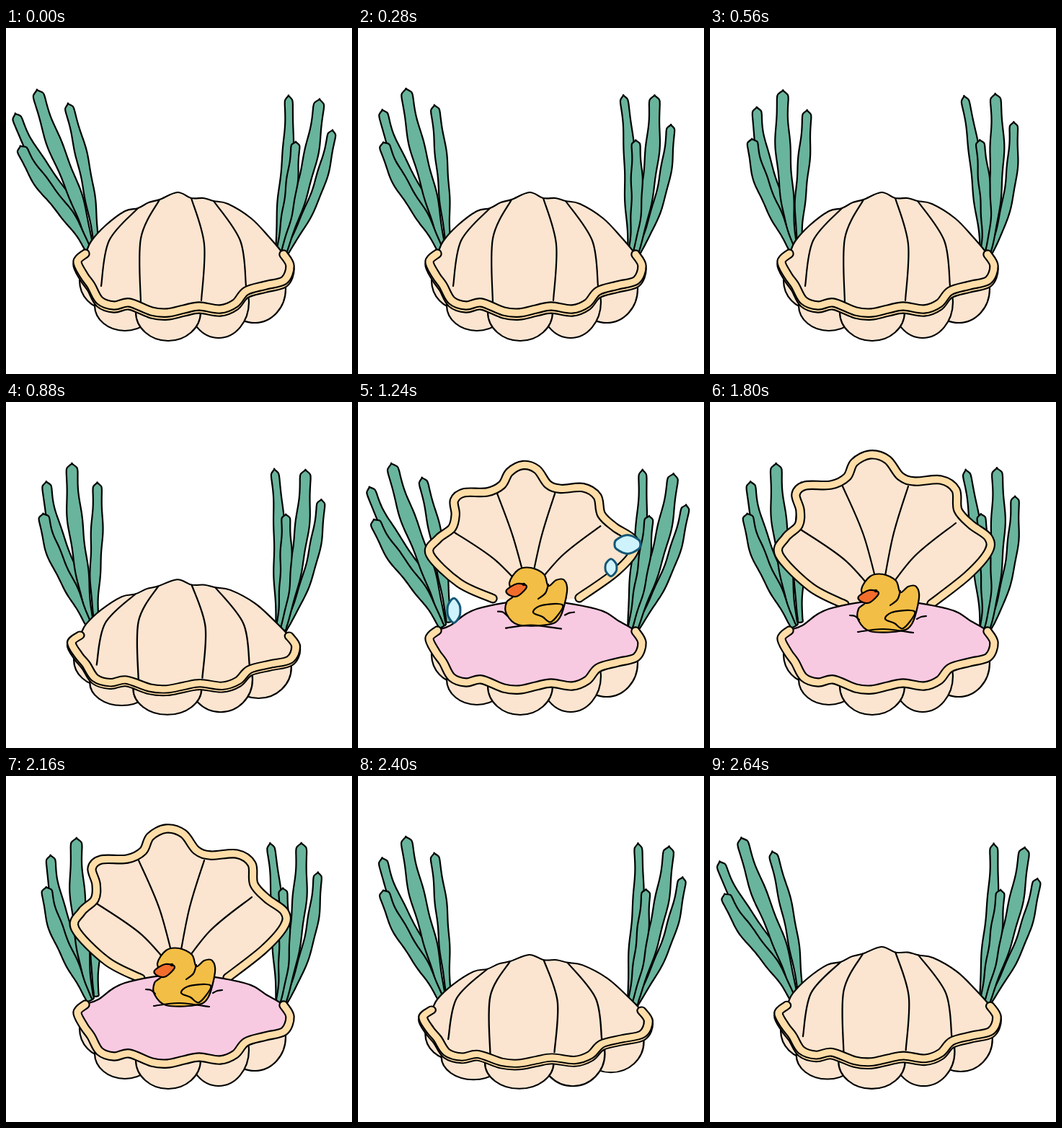
Write an HTML page with a canvas that moves like this. It is 480 by 480 pixels and loops after 2.68 s.

```html
<!DOCTYPE html>
<html lang="en">
<head>
<meta charset="utf-8">
<title>Duck in a shell</title>
<style>
html, body { margin: 0; width: 100%; height: 100%; overflow: hidden; background: #fff; }
canvas { display: block; width: 480px; height: 480px; }
</style>
</head>
<body>
<canvas id="stage" width="480" height="480"></canvas>
<script>
const ctx = document.getElementById('stage').getContext('2d');
const LOOP = 2680, SWAY = LOOP / 2;
const GREEN = '#69b49c', SHELL = '#fbe5d0', RIM = '#fedda8', PINK = '#f8cae1', YELLOW = '#f3be45';

// Each leaf: tip x, tip y, base x, base y, bow, S-bend, half width
const weeds = [
  { x: 115, y: 305, swing: 16.5, reach: 130, lead: 0, shrink: 0.055, leaves: [
    [13,119, 118,310, 1, -6, 7], [43,86, 118,310, 2, -3, 8.5], [86,105, 126,305, 5, 0, 6.7], [20,164, 116,312, 0, -4, 8]
  ] },
  { x: 375, y: 310, swing: -11.2, reach: 60, lead: 110, shrink: 0, leaves: [
    [392,94, 377,316, 3, 2, 6], [453,142, 385,318, 11, 0, 6.2], [435,99, 384,316, 6, 1, 8], [402,158, 377,316, 4, 0, 6.5]
  ] }
];

// Middle line of the wavy rim, shared by both halves of the shell
const lip = [110,317, 99,328, 108,347, 118,361, 130,382, 150,389, 171,385, 202,397, 224,399, 247,394, 268,390, 297,394,
  318,386, 333,369, 360,361, 386,354, 394,334, 385,318];
const pillowTop = [362,304, 330,287, 245,275, 165,287, 128,310];
const domeTop = [365,290, 340,264, 308,244, 288,240, 274,236, 257,236, 238,228, 213,238, 198,242, 183,250, 165,254, 138,274, 118,296];
const domeRibs = [
  [183,250, 143,295, 132,358], [213,238, 187,292, 187,382], [257,236, 275,300, 271,378], [288,240, 325,295, 333,358]
];
const lobes = [[140,350, 38,40], [345,362, 43,47], [165,385, 42,35], [295,380, 42,50], [225,394, 45,40]];

const lid = [187,281, 140,257, 96,212, 105,188, 123,171, 125,150, 119,128, 132,116, 168,115, 190,104, 200,84, 222,73,
  246,80, 264,103, 284,110, 320,108, 341,122, 344,150, 362,170, 386,188, 386,208, 357,241, 307,280];
const lidNotches = [[126,177], [184,117], [275,117], [341,168]];

const duck = [210,260, 222,242, 240,239, 258,248, 264,264, 275,256, 286,256, 290,272, 280,308, 262,318, 222,318, 206,303,
  206,287, 216,277];
const wing = [243,301, 252,292, 277,289, 284,294, 268,314, 256,307];
const beak = [206,270, 221,261, 234,265, 222,278, 210,277];

// x, y, half width, half height, drift, rise, shrink
const drops = [
  [133,285, 3,4, 7,190, 0], [133,290, 9,17, -9,182, 0], [374,198, 18,13, -29,110, 0.6], [351,230, 8,12, -13,77, 0.8]
];

const clamp = v => Math.max(0, Math.min(1, v));
const mix = (a, b, u) => a + (b - a) * u;
const same = (x, y) => [x, y];

function keyed(t, keys) {
  let i = 0;
  while (i < keys.length - 2 && t >= keys[i + 1][0]) i++;
  const [t0, a] = keys[i], [t1, b] = keys[i + 1];
  const u = clamp((t - t0) / (t1 - t0));
  return mix(a, b, u * u * (3 - 2 * u));
}

function trace(list, closed, map = same) {
  const p = [];
  for (let i = 0; i < list.length; i += 2) p.push(map(list[i], list[i + 1]));
  const n = p.length;
  const at = i => closed ? p[(i + n) % n] : p[Math.max(0, Math.min(n - 1, i))];
  ctx.beginPath();
  ctx.moveTo(...p[0]);
  for (let i = 0; i < (closed ? n : n - 1); i++) {
    const a = at(i - 1), b = at(i), c = at(i + 1), d = at(i + 2);
    ctx.bezierCurveTo(b[0] + (c[0] - a[0]) / 6, b[1] + (c[1] - a[1]) / 6,
      c[0] - (d[0] - b[0]) / 6, c[1] - (d[1] - b[1]) / 6, c[0], c[1]);
  }
}

function ink(width = 2.2, color = '#000') {
  ctx.lineWidth = width;
  ctx.strokeStyle = color;
  ctx.stroke();
}

function shape(list, fill, map) {
  trace(list, true, map);
  ctx.fillStyle = fill;
  ctx.fill();
  ink();
}

function line(list, map) {
  trace(list, false, map);
  ink();
}

function band(list, map) {
  trace(list, false, map);
  ink(13.5);
  ink(9.2, RIM);
}

function drawWeed({ x, y, swing, reach, lead, shrink, leaves }, t) {
  const swayAt = time => (1 - Math.cos(2 * Math.PI * (time + lead) / SWAY)) / 2;
  const s = swayAt(t) - swayAt(0);
  const bend = (px, py) => {
    const dx = px - x, dy = py - y, k = 1 - shrink * s;
    const a = swing * Math.PI / 180 * Math.tanh(Math.hypot(dx, dy) / reach) * s;
    return [x + k * (dx * Math.cos(a) - dy * Math.sin(a)), y + k * (dx * Math.sin(a) + dy * Math.cos(a))];
  };
  for (const [tipX, tipY, baseX, baseY, bow, wave, half] of leaves) {
    const spine = u => bend(
      mix(tipX, baseX, u) + bow * Math.sin(Math.PI * u) + wave * Math.sin(2 * Math.PI * u), mix(tipY, baseY, u));
    const left = [], right = [];
    for (let i = 0; i <= 40; i++) {
      const u = i / 40, [px, py] = spine(u), [qx, qy] = spine(u + 0.01);
      const len = Math.hypot(qx - px, qy - py), cap = clamp(u * 20);
      const w = half * Math.sqrt(cap * (2 - cap)) * (1 - u ** 3 / 2)
        * (0.8 + 0.42 * Math.sin(Math.PI * u) + 0.1 * Math.cos(6 * Math.PI * u));
      const nx = (qy - py) / len * w, ny = (px - qx) / len * w;
      left.push(px - nx, py - ny);
      right.unshift(px + nx, py + ny);
    }
    shape([...left, ...right], GREEN);
  }
}

function drawLid(open) {
  const map = (x, y) => {
    const height = (285 - y) / 218;
    const pinch = Math.min(0.2, Math.max(0, 1.8 * (1 - open))) * height * height;
    return [mix(x, 260, pinch), 285 + (y - 285) * open - Math.min(9, 80 * Math.max(0, 1 - open))];
  };
  trace(lid, true, map);
  ctx.fillStyle = SHELL;
  ctx.fill();
  for (const [x, y] of lidNotches) line([x, y, mix(x, 237, 0.56), mix(y, 275, 0.44), 237, 275], map);
  band(lid, map);
}

function drawDuck(lift) {
  ctx.save();
  ctx.translate(0, lift);
  shape(duck, YELLOW);
  line([264,262, 260,274, 250,282]);
  shape(wing, YELLOW);
  shape(beak, '#f26d2c');
  ctx.beginPath();
  ctx.arc(230, 262, 2.3, 0, 7);
  ctx.fillStyle = '#000';
  ctx.fill();
  ctx.translate(0, -lift * 0.4);
  line([205,319, 240,315, 282,320]);
  line([194,296, 201,297, 207,302]);
  line([287,301, 293,298, 300,297]);
  ctx.restore();
}

function drawDrops(t) {
  const u = (t - 1240) / 240;
  const fade = clamp((1.6 - u) / 0.5);
  if (u < -0.17 || fade <= 0) return;
  for (const [x, y, w, h, drift, rise, shrink] of drops) {
    const size = fade * Math.max(0, 1 - shrink * u), k = 0.85 - 0.4 * clamp(u);
    if (size <= 0) continue;
    trace([-0.85,-0.5, 0,-1, 0.85,-0.5, 1,0, k,0.5, 0,1, -k,0.5, -1,0], true,
      (px, py) => [x + drift * u + px * w * size, y - rise * u + py * h * size]);
    ctx.fillStyle = '#cff3fd';
    ctx.fill();
    ink(Math.min(3, w * size), '#145776');
  }
}

function drawShell(open, lift) {
  const isOpen = open > 0.3;
  if (isOpen) drawLid(open);
  for (const [x, y, rx, ry] of lobes) {
    ctx.beginPath();
    ctx.ellipse(x, y, rx, ry, 0, 0, 2 * Math.PI);
    ctx.fillStyle = SHELL;
    ctx.fill();
    ink();
  }
  if (isOpen) {
    shape([...lip, ...pillowTop], PINK);
    band(lip);
    drawDuck(lift);
  } else {
    const raise = (x, y) => [x, y - 4];
    band(lip);
    shape([...lip, ...domeTop], SHELL, (x, y) => y > 312 ? raise(x, y) : [x, y]);
    for (const rib of domeRibs) line(rib);
    band(lip, raise);
  }
}

function draw(t) {
  const open = keyed(t, [[1120, 0], [1160, 0.6], [1240, 0.89], [1340, 1.02], [1440, 1], [2160, 1], [2200, 0.6], [2240, 0]]);
  const squash = keyed(t, [[600, 0], [880, 1], [1030, 1.1], [1120, 0], [2240, 0], [2360, 1.1], [2560, 1], [2720, 0]]);
  const lift = keyed(t, [[1140, 18], [1240, -9], [1300, -9], [1380, 3], [1460, 0]]);

  ctx.fillStyle = '#fff';
  ctx.fillRect(0, 0, 480, 480);
  ctx.lineJoin = ctx.lineCap = 'round';
  for (const weed of weeds) drawWeed(weed, t);
  ctx.save();
  ctx.translate(246, 432);
  ctx.scale(1 + 0.055 * squash, 1 - 0.09 * squash);
  ctx.translate(-246, -432);
  drawShell(open, lift);
  ctx.restore();
  drawDrops(t);
}

function tick() {
  draw(performance.now() % LOOP);
  requestAnimationFrame(tick);
}
tick();
</script>
</body>
</html>
```
